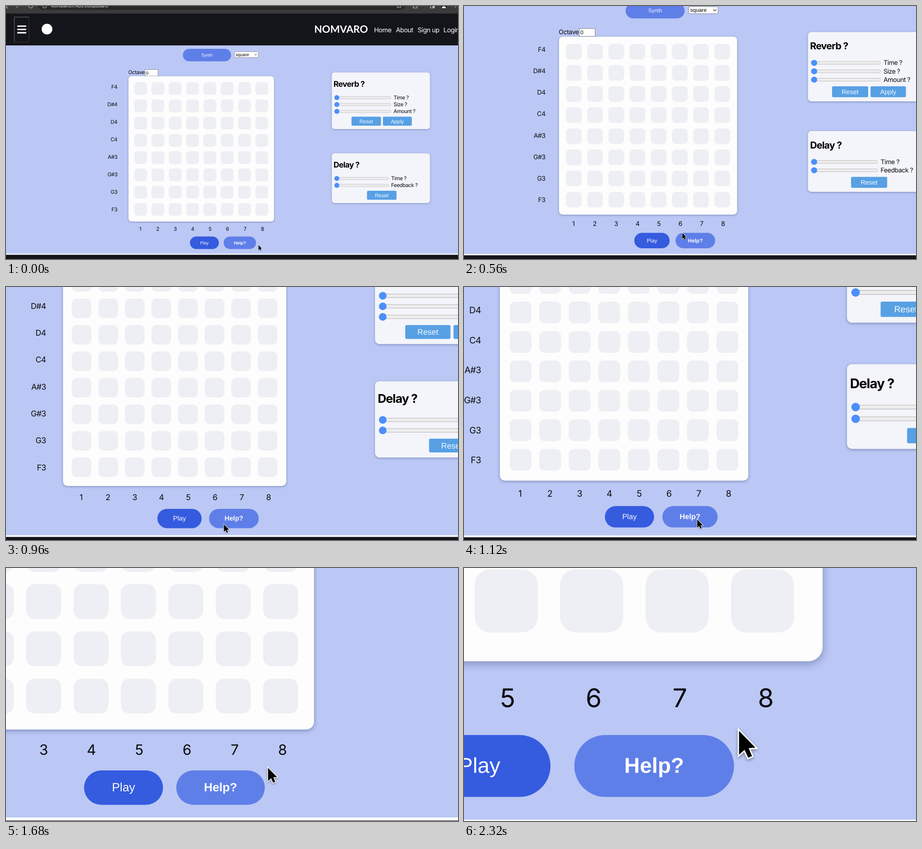
Animation, 926 px wide and 520 px high, one loop 2.4 s. Source, as an HTML page with a canvas:

```html
<!DOCTYPE html>
<html lang="en">
<head>
<meta charset="utf-8">
<title>Step sequencer zoom</title>
<style>
html, body { margin: 0; width: 100%; height: 100%; overflow: hidden; background: #bbc8f5; }
canvas { display: block; width: 926px; height: 520px; }
</style>
</head>
<body>
<canvas id="stage" width="926" height="520"></canvas>
<script>
const ctx = document.getElementById('stage').getContext('2d');
const LOOP = 2400, STEP = 80;
const FOCUS = { x: 501.8, y: 507 };
const UI = 'Inter, "Noto Sans", sans-serif';
const FORM = '"Liberation Sans", Arial, sans-serif';
const BODY = 10.72, SMALL = 8.95;

// Camera view width (1 = whole page) and pointer position over time
const times = [0, 560, 960, 1360, 1680, 2000, 2320];
const view = spline([1, .8167, .6517, .4883, .3653, .24266, .20268]);
const pointX = spline([517, 457, 465.4, 521.9, 514.3, 514.2, 514]);
const pointY = spline([491, 473.5, 494, 477.7, 471.2, 471.3, 471.5]);

let zoom = 1;

// Monotone cubic interpolation through the shared key times
function spline(v) {
  const n = v.length;
  const h = [], d = [], m = [];
  for (let i = 0; i < n - 1; i++) {
    h[i] = times[i + 1] - times[i];
    d[i] = (v[i + 1] - v[i]) / h[i];
  }
  for (let i = 1; i < n - 1; i++) {
    const a = 2 * h[i] + h[i - 1], b = h[i] + 2 * h[i - 1];
    m[i] = d[i - 1] * d[i] <= 0 ? 0 : (a + b) / (a / d[i - 1] + b / d[i]);
  }
  m[0] = ((2 * h[0] + h[1]) * d[0] - h[0] * d[1]) / (h[0] + h[1]);
  m[n - 1] = 0;
  return t => {
    let i = 0;
    while (i < n - 2 && t > times[i + 1]) i++;
    const u = Math.min(1, (t - times[i]) / h[i]), w = 1 - u;
    return v[i] * (1 + 2 * u) * w * w + v[i + 1] * (3 - 2 * u) * u * u
      + h[i] * (m[i] * u * w * w - m[i + 1] * w * u * u);
  };
}

function rect(x, y, w, h, color) {
  ctx.fillStyle = color;
  ctx.fillRect(x, y, w, h);
}

function round(x, y, w, h, r, color, border) {
  ctx.beginPath();
  ctx.roundRect(x, y, w, h, r);
  ctx.fillStyle = color;
  ctx.fill();
  if (border) {
    ctx.strokeStyle = border;
    ctx.lineWidth = .67;
    ctx.stroke();
  }
}

function disc(x, y, r, color) {
  ctx.beginPath();
  ctx.arc(x, y, r, 0, Math.PI * 2);
  ctx.fillStyle = color;
  ctx.fill();
}

function line(points, color, width) {
  ctx.beginPath();
  points.forEach(([x, y]) => ctx.lineTo(x, y));
  ctx.strokeStyle = color;
  ctx.lineWidth = width;
  ctx.stroke();
}

function text(str, x, y, { size = BODY, family = UI, weight = 400, color = '#0b0b0d', align = 'left' } = {}) {
  ctx.font = `${weight} ${size}px ${family}`;
  ctx.letterSpacing = family === UI ? `${-.037 * size}px` : '0px';
  ctx.textAlign = align;
  ctx.fillStyle = color;
  ctx.fillText(str, x, y);
}

function shadow(color, dy, blur) {
  ctx.shadowColor = color;
  ctx.shadowOffsetY = dy * zoom;
  ctx.shadowBlur = blur * zoom;
}

function card(x, y, w, h, color) {
  ctx.save();
  shadow('rgba(20, 30, 80, .36)', .9, 3.6);
  round(x, y, w, h, 6, color);
  ctx.restore();
}

function pill(label, x, y, w, color, weight = 400) {
  round(x, y, w, 25.8, 12.9, color);
  text(label, x + w / 2, y + 15.8, { size: SMALL, family: FORM, weight, color: '#fafbff', align: 'center' });
}

function action(label, x, y, w) {
  round(x, y, w, 18.5, 2, '#57a0e4');
  text(label, x + w / 2, y + 13, { family: FORM, color: '#f8fbff', align: 'center' });
}

function slider(label, y, end) {
  round(673, y - 2.4, end - 673, 4.8, 2.4, '#ededee', '#b6b6b8');
  disc(677.8, y, 5.1, '#4b8ffb');
  text(label, end + 5.3, y + 3.7);
}

function panel(title, y, h, end, labels) {
  card(667.4, y, 201.2, h, '#f4f5fa');
  text(title, 671, y + 29.2, { size: 16.08, weight: 700, color: '#000' });
  labels.forEach((label, i) => slider(label, y + 51.8 + i * 14.1, end));
}

function browserBar() {
  rect(0, 0, 926, 16, '#3b3b3c');
  round(64, -18, 756, 26, 13, '#282829');
  text('workbench:4821/loopboard', 92, 3.2, { size: 9.6, color: '#d5d5d7' });
  const icon = '#c4c4c6';
  line([[4, -3], [0, 1], [4, 5]], icon, 1.2);
  line([[20, -3], [24, 1], [20, 5]], '#858587', 1.2);
  for (const [x, r] of [[50.5, 4], [79, 4]]) {
    ctx.beginPath();
    ctx.arc(x, 0, r, 0, Math.PI);
    ctx.strokeStyle = icon;
    ctx.lineWidth = 1.1;
    ctx.stroke();
  }
  line([[801.5, -1], [802, 4], [805, 2], [808, 4], [808.5, -1]], icon, 1);
  line([[834.5, -2], [834.5, 4], [842, 4], [842, -2]], icon, 1.2);
  line([[869.5, -2], [869.5, 4], [877.5, 4], [877.5, -2]], icon, 1.2);
  rect(874, -2, 3.5, 6, icon);
  disc(897, 0, 5.8, '#18181a');
  disc(897, -1, 2, '#fff');
  round(893, 1.5, 8, 3, 1.5, '#fff');
  disc(921, 2, 1, icon);
}

function header() {
  rect(0, 15.5, 926, 65.5, '#14151a');
  line([[47, 22.5], [47, 74], [17, 74]], '#36373b', 1);
  line([[17, 74], [17, 22.8], [47, 22.8]], '#707174', 1);
  for (const y of [40, 46.8, 53.6]) round(23, y, 18.6, 2.8, .8, '#fff');
  disc(84, 47.5, 11, '#fff');
  text('NOMVARO', 686.5, 55, { size: 20.8, family: 'Lato, sans-serif', weight: 700, color: '#fff', align: 'center' });
  [['Home', 754], ['About', 798.8], ['Sign up', 843.3], ['Login', 896.3]]
    .forEach(([label, x]) => text(label, x, 53.8, { size: 13.4, color: '#fff' }));
}

function controls() {
  pill('Synth', 362.4, 88, 98.7, '#5f7fe8');
  round(468, 94, 48.9, 11.8, 1.5, '#fff', '#767676');
  text('square', 470.6, 102.8, { size: SMALL, family: FORM, color: '#000' });
  line([[509, 98.7], [511.6, 101.2], [514.2, 98.7]], '#222', .9);
  text('Octave', 250.5, 140.4);
  rect(284.6, 130.4, 27.2, 14, '#767676');
  rect(285.3, 131.1, 25.8, 12.6, '#fff');
  text('0', 286.8, 140.6, { size: SMALL, family: FORM, color: '#000' });
}

function grid() {
  card(250.9, 144.3, 298.1, 298.8, '#fdfdfd');
  ['F4', 'D#4', 'D4', 'C4', 'A#3', 'G#3', 'G3', 'F3'].forEach((note, row) => {
    text(note, 228.1, 169.5 + row * 36.1, { align: 'right' });
    text(String(row + 1), 275 + row * 35.75, 462.2, { align: 'center' });
    for (let col = 0; col < 8; col++) {
      round(262.65 + col * 35.47, 156.6 + row * 35.47, 26.2, 26.2, 6.4, '#eeeff4');
    }
  });
  pill('Play', 376.9, 473.8, 59.1, '#355bdf');
  pill('Help?', 445.9, 473.8, 66.3, '#5f7fe8', 700);
}

function effects() {
  panel('Reverb ?', 136.6, 116.4, 788.6, ['Time ?', 'Size ?', 'Amount ?']);
  action('Reset', 707.8, 227.6, 60.4);
  action('Apply', 772.2, 227.6, 59.2);
  panel('Delay ?', 302.8, 102.2, 783.8, ['Time ?', 'Feedback ?']);
  action('Reset', 739.6, 379.7, 60.4);
}

function pointer(x, y) {
  ctx.save();
  ctx.translate(x + .3, y + .6);
  ctx.beginPath();
  [[0, 0], [0, 9.9], [2.3, 7.9], [3.8, 11.2], [5.4, 10.5], [4, 7.2], [6.8, 7]]
    .forEach(([px, py]) => ctx.lineTo(px, py));
  ctx.closePath();
  ctx.lineWidth = 1.1;
  ctx.strokeStyle = '#fff';
  shadow('rgba(0, 0, 0, .4)', .5, 1.4);
  ctx.stroke();
  shadow('transparent', 0, 0);
  ctx.fillStyle = '#000';
  ctx.fill();
  ctx.restore();
}

function draw(t) {
  zoom = 1 / view(t);
  ctx.setTransform(zoom, 0, 0, zoom, FOCUS.x * (1 - zoom), FOCUS.y * (1 - zoom));
  ctx.textRendering = 'geometricPrecision';
  rect(0, 0, 926, 520, '#bbc8f5');
  browserBar();
  header();
  controls();
  grid();
  effects();
  rect(0, 509.1, 926, 2.3, '#fdfdfd');
  rect(0, 511.4, 926, 9, '#14151a');
  pointer(pointX(t), pointY(t));
}

function tick() {
  const t = performance.now() % LOOP;
  draw(Math.floor(t / STEP) * STEP);
  requestAnimationFrame(tick);
}
tick();
</script>
</body>
</html>
```
